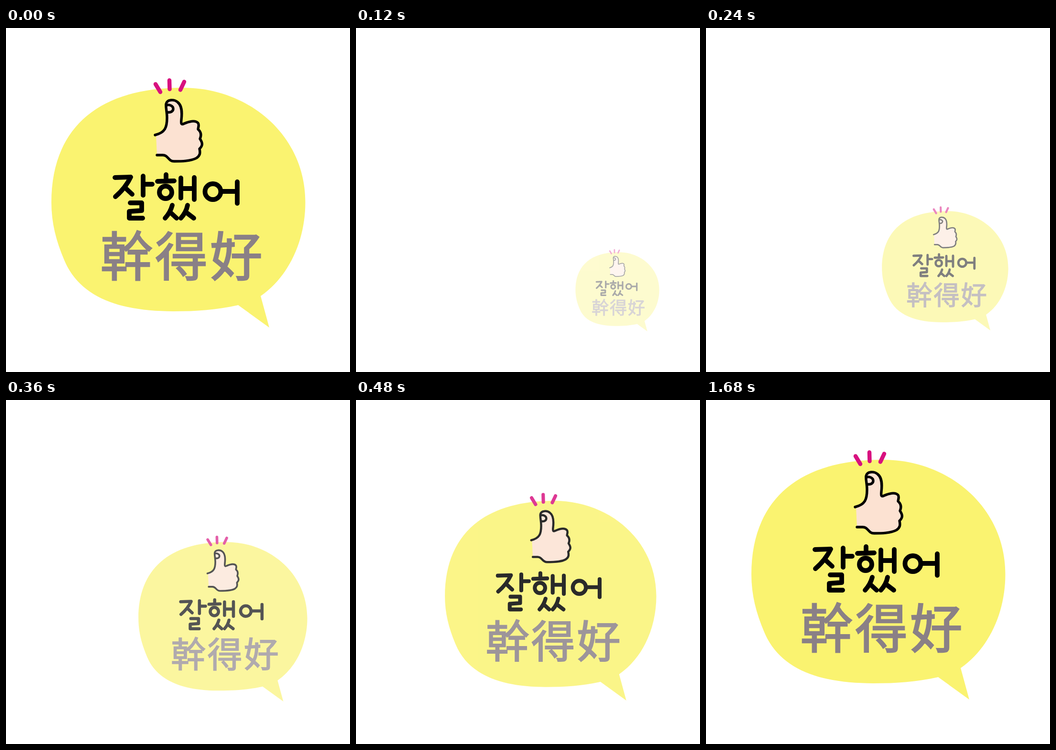
Animation, 720 px wide and 720 px high, one loop 2400 ms. Source, as an HTML page:

```html
<!DOCTYPE html>
<html lang="zh-Hant">
<head>
<meta charset="utf-8">
<title>잘했어 幹得好</title>
<style>
  html, body { margin: 0; width: 100%; height: 100%; overflow: hidden; background: #fff; }
  svg { display: block; width: 100%; height: 100%; }
  .line { fill: none; stroke: #000; stroke-linecap: round; stroke-linejoin: round; }
  text {
    font: 110px "Noto Sans CJK TC", "Noto Sans CJK", sans-serif; letter-spacing: 4.6px;
    fill: #8a8086; stroke: #8a8086; stroke-width: 2.6px;
  }
</style>
</head>
<body>
<svg viewBox="0 0 720 720">
  <g id="sticker">
    <path fill="#faf370" d="M486 580L551 627L533 561C596 517 626.5 440 626.5 365C626.5 223 507 125 370 125
      C190 125 95 212 95 365C95 408 105 446 122 486C155 565 240 593 350 593C400 593 440 590 486 580Z"/>

    <path class="line" style="stroke:#d8107f" stroke-width="8.5"
      d="M313 117.5L323 134M342 109.5L342.5 128M373 112.5L365 129.5"/>

    <path fill="#fce2d2" d="M314 224C333 219 337 208 337 188C337 175 334 166 335 159C337 149 352 149 359 155
      C368 162 369 175 367 192C366 201 367 203 373 200C382 196 396 192 402 199C405 203 402 208 402 212
      C409 218 409 225 406 232C412 241 412 246 405 253C407 262 406 267 399 272C387 279 366 279 352 279
      C339 279 340 266 328 266H316Z"/>
    <path class="line" stroke-width="5.4" d="M312 224C333 219 337 208 337 188C337 175 334 166 335 159
      C337 149 352 149 359 155C368 162 369 175 367 192C366 201 367 203 373 200C382 196 396 192 402 199
      C405 203 402 208 402 212C409 218 409 225 406 232C412 241 412 246 405 253C407 262 406 267 399 272
      C387 279 366 279 352 279C339 279 340 266 328 266H316M336 162C341 159 350 163 350 169C350 174 345 178 337 176"/>

    <g class="line" stroke-width="9.8">
      <path d="M228 313L261 312Q250 335 229 353M248 333L264 348M287 310V350M287 327H306
        M260 366H284V382L258 384V398H286"/>
      <path d="M335 307V318M317 321L352 320M366 314V356M394 313V359M366 336H394
        M348 371Q344 386 333 398M343 385L357 398M380 371Q377 386 366 398M376 385L393 398"/>
      <circle cx="334" cy="344" r="13"/>
      <circle cx="433" cy="342.5" r="16.5"/>
      <path d="M451 342H484M484 322V367"/>
    </g>

    <text x="197.5" y="518.5">幹得好</text>
  </g>
</svg>
<script>
  const LOOP = 2400, STEP = 120, LAST = 4;
  const sticker = document.getElementById("sticker");

  // The sticker rests for one step, then grows and fades in from the lower right in hard steps.
  function draw(now) {
    const step = Math.floor((now % LOOP) / STEP);
    const progress = step === 0 ? 1 : Math.min((step - 1) / LAST, 1);
    const scale = 0.33 + 0.67 * progress;
    const shift = 428 * (1 - progress);
    sticker.setAttribute("transform", `translate(${shift} ${shift}) scale(${scale})`);
    sticker.setAttribute("opacity", scale);
    requestAnimationFrame(draw);
  }
  draw(performance.now());
</script>
</body>
</html>
```
